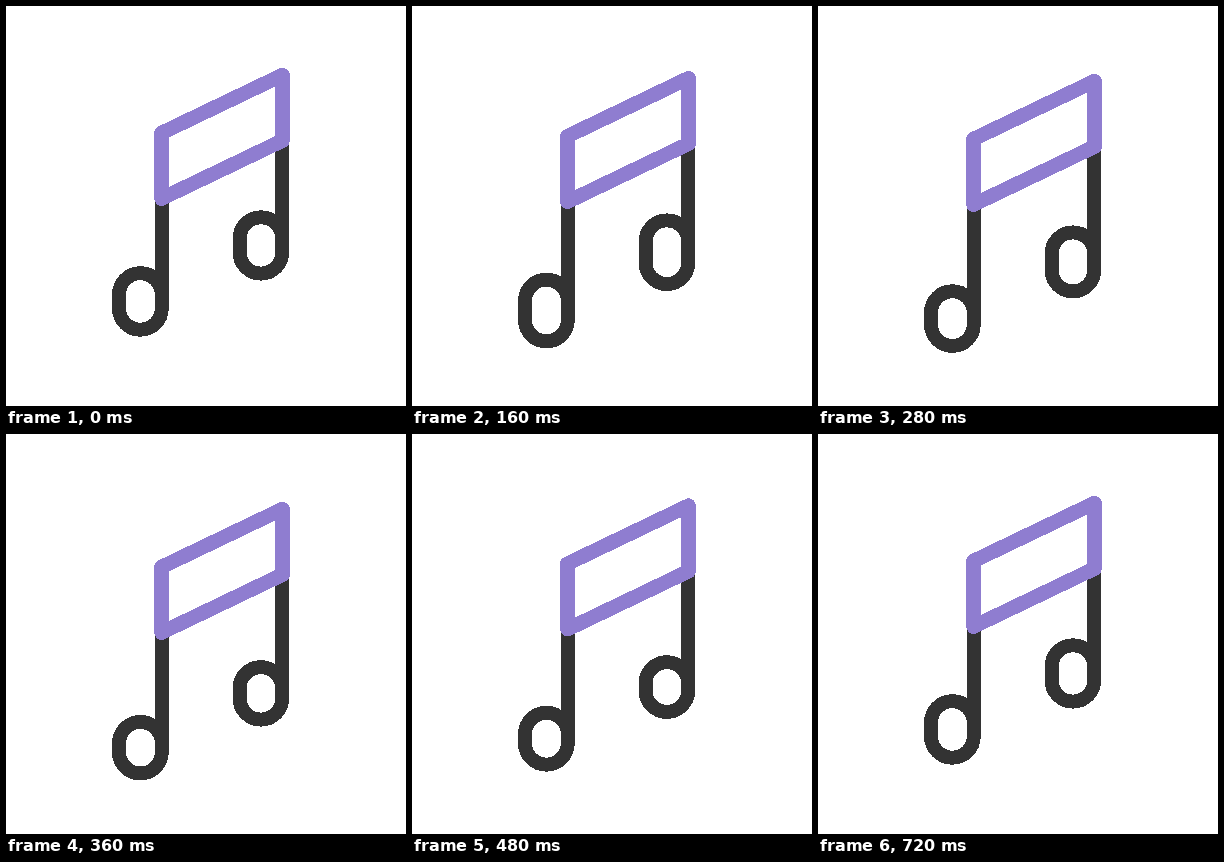
These frames come from a looping animation (400x400 px, 0.8 s). An HTML page:

```html
<!DOCTYPE html>
<html lang="en">
<head>
<meta charset="utf-8">
<title>Music note</title>
<style>
  html, body { margin: 0; width: 100%; height: 100%; overflow: hidden; background: #fff; }
  svg { display: block; width: 100vw; height: 100vh; }
  path { fill: none; stroke: #333; stroke-width: 14; stroke-linejoin: round; shape-rendering: crispEdges; }
  #beam { stroke: #8f7dd0; stroke-width: 14.5; }
</style>
</head>
<body>
<svg viewBox="0 0 400 400">
  <path id="left"/>
  <path id="right"/>
  <path id="beam" d="M155.5 127 L276.5 69 V134.6 L155.5 192.6 Z"/>
</svg>
<script>
const LOOP = 800, STEP = 40;
const shape = id => document.getElementById(id);

// Sinks to depth at the peak time, then eases back by the end time.
// A higher lag makes the start slower.
function dip(t, depth, peak, end, lag) {
  if (t >= end) return 0;
  return t < peak
    ? depth * Math.sin(Math.PI / 2 * t / peak) ** lag
    : depth * (1 + Math.cos(Math.PI * (t - peak) / (end - peak))) / 2;
}

function note(x, r, stemTop, top, bottom) {
  return `M${x} ${stemTop} V${bottom - r} a${r} ${r} 0 0 1 ${-2 * r} 0`
    + ` V${top + r} a${r} ${r} 0 0 1 ${2 * r} 0`;
}

function draw(now) {
  const t = Math.floor(now % LOOP / STEP) * STEP;
  const y = dip(t, 6.3, 320, 610, 2);
  shape('beam').setAttribute('transform', `translate(0 ${y})`);
  shape('left').setAttribute('d', note(155.8, 21.4, 190 + y,
    267.2 + dip(t, 20.8, 350, 630, 2.8),
    323.7 + dip(t, 16.5, 320, 610, 1)));
  shape('right').setAttribute('d', note(276.2, 21.3, 134 + y,
    211.3 + dip(t, 22.5, 390, 660, 3.9),
    267.6 + dip(t, 18.5, 325, 660, 1.6)));
}

const start = performance.now();
function tick() {
  draw(performance.now() - start);
  requestAnimationFrame(tick);
}
tick();
</script>
</body>
</html>
```
